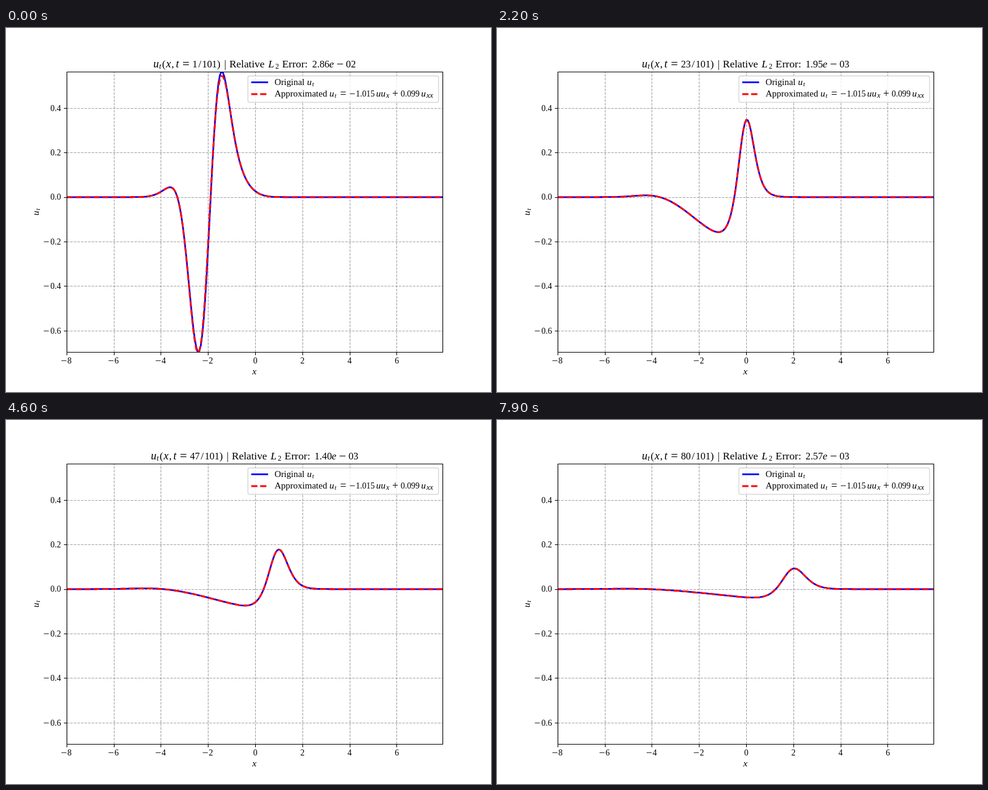
An HTML page with a canvas for the animation above (8000 ms loop, 800 px wide and 600 px high).

```html
<!DOCTYPE html>
<html>
<head>
<meta charset="utf-8">
<style>
  html, body { margin: 0; width: 100%; height: 100%; overflow: hidden; background: #fff; }
  canvas { display: block; }
</style>
</head>
<body>
<canvas id="stage" width="800" height="600"></canvas>
<script>
const ctx = document.getElementById('stage').getContext('2d');
const N = 256, DX = 1 / 16, DT = 0.1, FRAMES = 80;
const LEFT = 100, TOP = 72, WIDTH = 620, HEIGHT = 462;
const px = x => LEFT + (x + 8) * WIDTH / 15.9375;
const py = v => 278.8 - v * 367;

// Burgers' equation: u_t = -u u_x + 0.1 u_xx on a periodic grid
function rhs(u) {
  return u.map((c, j) => {
    const at = k => u[(j + k + N) % N];
    const ux = (8 * (at(1) - at(-1)) - at(2) + at(-2)) / (12 * DX);
    const uxx = (16 * (at(1) + at(-1)) - at(2) - at(-2) - 30 * c) / (12 * DX * DX);
    return -c * ux + 0.1 * uxx;
  });
}

function rk4(u, h) {
  const add = (k, s) => u.map((v, j) => v + s * k[j]);
  const a = rhs(u), b = rhs(add(a, h / 2)), c = rhs(add(b, h / 2)), d = rhs(add(c, h));
  return u.map((v, j) => v + h / 6 * (a[j] + 2 * b[j] + 2 * c[j] + d[j]));
}

const states = [Array.from({ length: N }, (_, j) => Math.exp(-((j * DX - 6) ** 2)))];
while (states.length < FRAMES + 1) {
  let u = states[states.length - 1];
  for (let s = 0; s < 10; s++) u = rk4(u, DT / 10);
  states.push(u);
}

// Second-order time difference, one-sided at the start
function measured(i) {
  return states[i].map((v, j) => i
    ? (states[i + 1][j] - states[i - 1][j]) / (2 * DT)
    : (-3 * v + 4 * states[1][j] - states[2][j]) / (2 * DT));
}
const measuredCurves = Array.from({ length: FRAMES }, (_, i) => measured(i));
const fittedCurves = states.slice(0, FRAMES).map(rhs);

const errorKeys = [[0, 2.86e-2], [1, 1.05e-2], [8, 2.56e-3], [22, 1.95e-3],
  [38, 1.26e-3], [54, 1.56e-3], [67, 2.02e-3], [79, 2.57e-3]];
function errorAt(i) {
  const n = Math.max(1, errorKeys.findIndex(k => k[0] >= i));
  const [i0, e0] = errorKeys[n - 1], [i1, e1] = errorKeys[n];
  return e0 * (e1 / e0) ** ((i - i0) / (i1 - i0));
}

function put(str, x, y, size, style = '', align = 'left') {
  ctx.font = `${style} ${size}px "Liberation Serif", serif`;
  ctx.textAlign = align;
  ctx.fillStyle = '#000';
  ctx.fillText(str, x, y);
}
const it = (str, x, y, size) => put(str, x, y, size, 'italic');
const op = (str, x, y, size) => put(str, x, y + size * 0.09, size * 1.28, '', 'center');

function line(points, color, width, dash = []) {
  ctx.beginPath();
  points.forEach(([x, y]) => ctx.lineTo(x, y));
  ctx.strokeStyle = color;
  ctx.lineWidth = width;
  ctx.setLineDash(dash);
  ctx.stroke();
}
const RED_DASH = [10.28, 4.44], GRID_DASH = [4.11, 1.78];
const snap = v => Math.round(v - 0.3) + 0.5;
const xTicks = [-8, -6, -4, -2, 0, 2, 4, 6];
const yTicks = [-0.6, -0.4, -0.2, 0, 0.2, 0.4];

function drawGrid() {
  const color = '#a5a0a7';
  xTicks.forEach(v => {
    const x = snap(px(v));
    line([[x, TOP + HEIGHT], [x, TOP]], color, 1.11, GRID_DASH);
  });
  yTicks.forEach(v => {
    const y = snap(py(v));
    line([[LEFT, y], [LEFT + WIDTH, y]], color, 1.11, GRID_DASH);
  });
}

function drawAxes() {
  ctx.setLineDash([]);
  ctx.strokeStyle = '#000';
  ctx.lineWidth = 1.11;
  ctx.strokeRect(LEFT + 0.5, TOP + 0.5, WIDTH, HEIGHT);
  xTicks.forEach(v => {
    const x = px(v), sx = snap(x);
    line([[sx, 534.5], [sx, 539.4]], '#000', 1.11);
    put(Math.abs(v), v < 0 ? x + 4.6 : x, 553, 13.9, '', 'center');
    if (v < 0) op('−', x - 4.6, 553, 13.9);
  });
  yTicks.forEach(v => {
    const y = py(v), sy = snap(y);
    line([[95.6, sy], [100.5, sy]], '#000', 1.11);
    put(Math.abs(v).toFixed(1), 90.6, y + 4.6, 13.9, '', 'right');
    if (v < 0) op('−', 66.6, y + 4.6, 13.9);
  });
  it('x', 406.3, 571, 15.5);
  ctx.save();
  ctx.translate(54, 309);
  ctx.rotate(-Math.PI / 2);
  it('u', 0, 0, 15.5);
  it('t', 8.4, 2.2, 11);
  ctx.restore();
}

function drawLegend() {
  ctx.setLineDash([]);
  ctx.beginPath();
  ctx.roundRect(399, 79, 314.5, 43.5, 2.8);
  ctx.fillStyle = 'rgba(255,255,255,.8)';
  ctx.fill();
  ctx.strokeStyle = 'rgba(204,204,204,.8)';
  ctx.lineWidth = 1.39;
  ctx.stroke();
  line([[404.5, 89.5], [432.3, 89.5]], '#00f', 2.78);
  line([[404.5, 109], [432.3, 109]], '#f00', 2.78, RED_DASH);

  put('Original', 443, 94, 14.8);
  it('u', 496.6, 94, 15.5);
  it('t', 505, 96.2, 11);

  const y = 113;
  put('Approximated', 443, y, 15);
  it('u', 533.6, y, 15.5);
  it('t', 542, y + 2.2, 11);
  op('=', 556.3, y, 13.9);
  op('−', 571.3, y, 13.9);
  put('1.015', 577, y, 13.9);
  it('uu', 610.6, y, 15.5);
  it('x', 627, y + 2.2, 12);
  op('+', 642, y, 13.9);
  put('0.099', 651, y, 13.9);
  it('u', 684.8, y, 15.5);
  it('xx', 693.5, y + 2.2, 12.5);
}

function drawTitle(i) {
  const y = 64.5, step = String(i + 1);
  const shift = step.length > 1 ? 4.1 : 0;
  const l = -shift, r = shift;
  it('u', 243 + l, y, 18.3);
  it('t', 252.6 + l, y + 2.6, 13);
  put('(', 257.6 + l, y, 17);
  it('x', 264 + l, y, 18.3);
  put(',', 273 + l, y, 17);
  it('t', 280.2 + l, y, 18.3);
  op('=', 296.8 + l, y, 16.2);
  put(step, 307.5 + l, y, 16.2);
  put('/', 317.2 + r, y, 17.5);
  put('101', 323.6 + r, y, 16.2);
  put(')', 348 + r, y, 17);
  put('|', 361.6 + r, y, 17, '', 'center');
  put('Relative', 368.5 + r, y, 17.4);
  it('L', 432.5 + r, y, 17.6);
  put('2', 444.2 + r, y + 2.6, 12);
  put('Error:', 455.5 + r, y, 17.7);
  const [mantissa, exponent] = errorAt(i).toExponential(2).split('e-');
  put(mantissa, 505 + r, y, 16.3);
  it('e', 533.2 + r, y, 17);
  op('−', 551 + r, y, 16.2);
  put(exponent.padStart(2, '0'), 560.8 + r, y, 16.2);
}

function draw(i) {
  ctx.fillStyle = '#fff';
  ctx.fillRect(0, 0, 800, 600);
  ctx.lineJoin = 'round';
  drawGrid();
  const toPath = curve => curve.map((v, j) => [px(j * DX - 8), py(v)]);
  ctx.save();
  ctx.beginPath();
  ctx.rect(LEFT, TOP, WIDTH, HEIGHT);
  ctx.clip();
  line(toPath(measuredCurves[i]), '#00f', 2.78);
  line(toPath(fittedCurves[i]), '#f00', 2.78, RED_DASH);
  ctx.restore();
  drawAxes();
  drawLegend();
  drawTitle(i);
}

const start = performance.now();
function tick() {
  draw(Math.floor((performance.now() - start) / 100) % FRAMES);
  requestAnimationFrame(tick);
}
tick();
</script>
</body>
</html>
```
